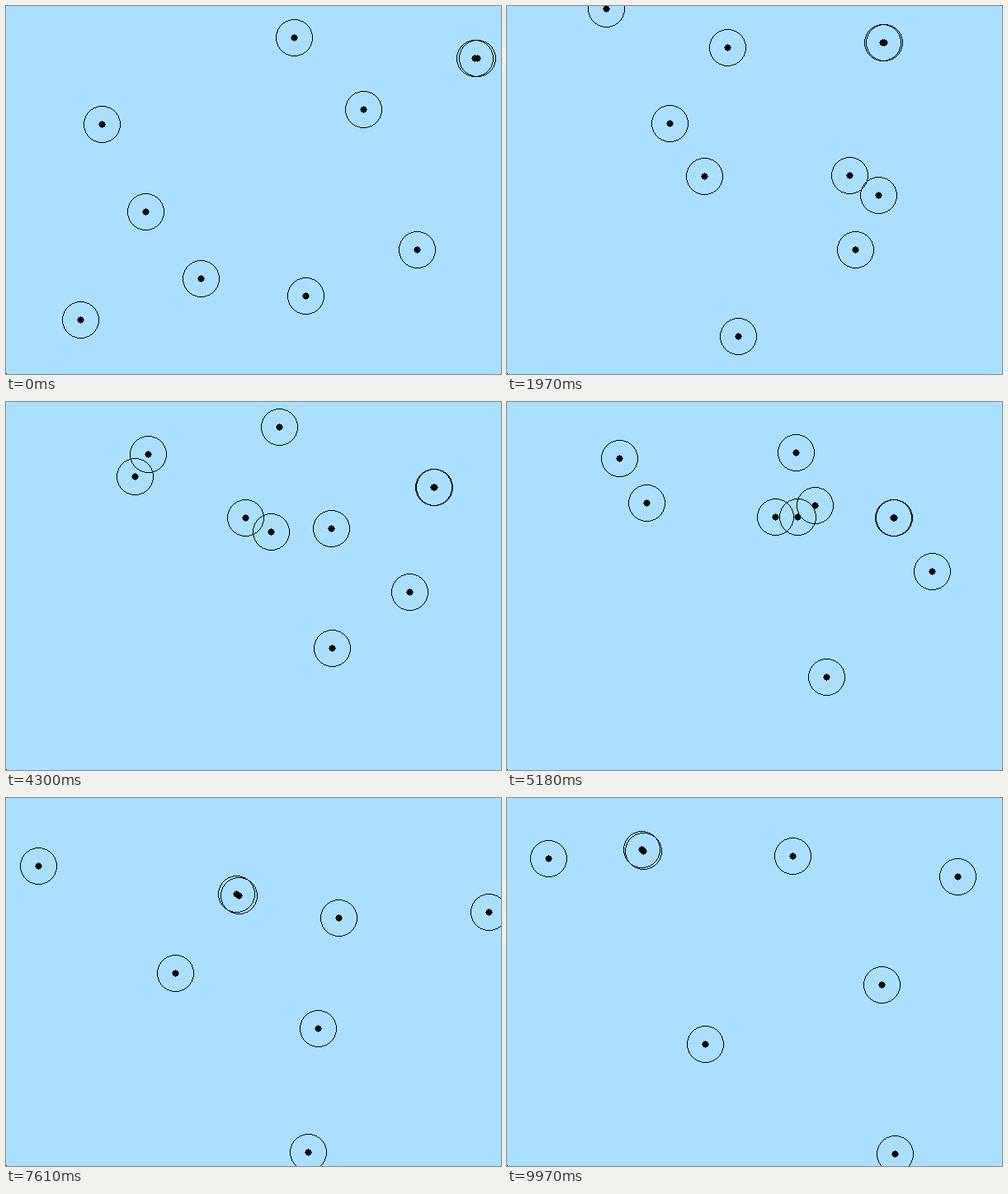
An HTML page with a canvas that plays this animation: 600 by 446 pixels, repeating every 10 s.

```html
<!DOCTYPE html>
<html lang="en">
<head>
<meta charset="utf-8">
<title>Drifting circles</title>
<style>
  html, body { margin: 0; width: 100%; height: 100%; overflow: hidden; background: #aadfff; }
  canvas { display: block; }
</style>
</head>
<body>
<canvas id="stage" width="600" height="446"></canvas>
<script>
const LOOP = 10000, TRIP = 9970;
const WRAP_X = 602, WRAP_Y = 452;
const RING = 22, DOT = 4;
const MEET = 5300, JOINED = 6060, MERGED = 7600;
const ctx = document.getElementById('stage').getContext('2d');

// Start position and distance travelled over one loop
const drifters = [
  [349, 38, -405, 57],
  [433, 125, -87, 397],
  [90, 380, 150, 370],
  [236, 330, 218, 348],
  [363, 351, 289, -278]
];

// Drifters that meet, with their place in the cluster and a gap that closes
const trio = [
  { line: [116, 143, 398, -7], place: [-1, -1], gap: -2 },
  { line: [169, 249, 348, -210], place: [1.5, 1], gap: -2 },
  { line: [498, 295, -239, -324], place: [-1, -1], gap: 4 }
];
const clusterCurve = [[345, 127], [269, 127], [163.5, 62.7]];

// Key points of the bound pair: time, x, y
const pairPath = [
  [0, 568, 63], [1120, 490, 76], [1900, 455, 47], [2820, 491, 12], [3500, 525, 44],
  [4300, 518, 103], [6060, 418, 178], [7610, 378, 279], [9970, 470, 431]
];

const mod = (v, n) => ((v % n) + n) % n;
const clamp = v => Math.min(1, Math.max(0, v));
const mix = (a, b, k) => a.map((v, i) => v + (b[i] - v) * k);
const bezier = ([a, b, c], k) => mix(mix(a, b, k), mix(b, c, k), k);

// Smooth curve through rows of [time, ...values]
function track(rows, t) {
  const last = rows.length - 1;
  if (t >= rows[last][0]) return rows[last].slice(1);
  const i = rows.findIndex(r => r[0] > t) - 1;
  const a = rows[i], b = rows[i + 1];
  const before = rows[Math.max(i - 1, 0)], after = rows[Math.min(i + 2, last)];
  const span = b[0] - a[0], u = (t - a[0]) / span;
  return a.slice(1).map((p, n) => {
    const k = n + 1, d = b[k] - p;
    const m0 = (b[k] - before[k]) / (b[0] - before[0]) * span;
    const m1 = (after[k] - p) / (after[0] - a[0]) * span;
    return p + u * (m0 + u * (3 * d - 2 * m0 - m1 + u * (m0 + m1 - 2 * d)));
  });
}

function along([x, y, dx, dy], s) {
  return [mod(x + dx * s + 1, WRAP_X) - 1, mod(y + dy * s + 1, WRAP_Y) - 1];
}

function member({ line, place, gap }, t, s) {
  const u = clamp((t - MEET) / (JOINED - MEET));
  const since = Math.max(0, t - JOINED);
  const [x, y] = bezier(clusterCurve, clamp(since / (TRIP - JOINED)));
  const spot = [x + place[0], y + place[1] + gap * Math.exp(-since / 400)];
  return mix(along(line, s), spot, u * u * (3 - 2 * u));
}

// Hard-edged ring and dot on whole pixels
function disc([px, py]) {
  const cx = Math.round(px), cy = Math.round(py);
  for (let a = 0; a <= RING * Math.SQRT1_2; a++) {
    const b = Math.round(Math.sqrt(RING * RING - a * a));
    for (const [x, y] of [[a, b], [b, a]]) {
      for (const sx of [-x, x]) {
        for (const sy of [-y, y]) ctx.fillRect(cx + sx, cy + sy, 1, 1);
      }
    }
  }
  for (let y = -DOT; y <= DOT; y++) {
    const half = Math.floor(Math.sqrt(DOT * DOT - y * y));
    ctx.fillRect(cx - half, cy + y, 2 * half + 1, 1);
  }
}

function draw(t) {
  const s = Math.pow(clamp(t / TRIP), .985);
  ctx.fillStyle = '#aadfff';
  ctx.fillRect(0, 0, 600, 446);
  ctx.fillStyle = '#000';
  ctx.fillRect(0, 445, 1, 1);

  drifters.forEach(d => disc(along(d, s)));
  trio.forEach(m => disc(member(m, t, s)));
  const [x, y] = track(pairPath, t).map(Math.round);
  disc([x, y]);
  disc([x + 3 * clamp(1 - t / MERGED), y]);
}

const start = performance.now();
function tick() {
  draw((performance.now() - start) % LOOP);
  requestAnimationFrame(tick);
}
tick();
</script>
</body>
</html>
```
